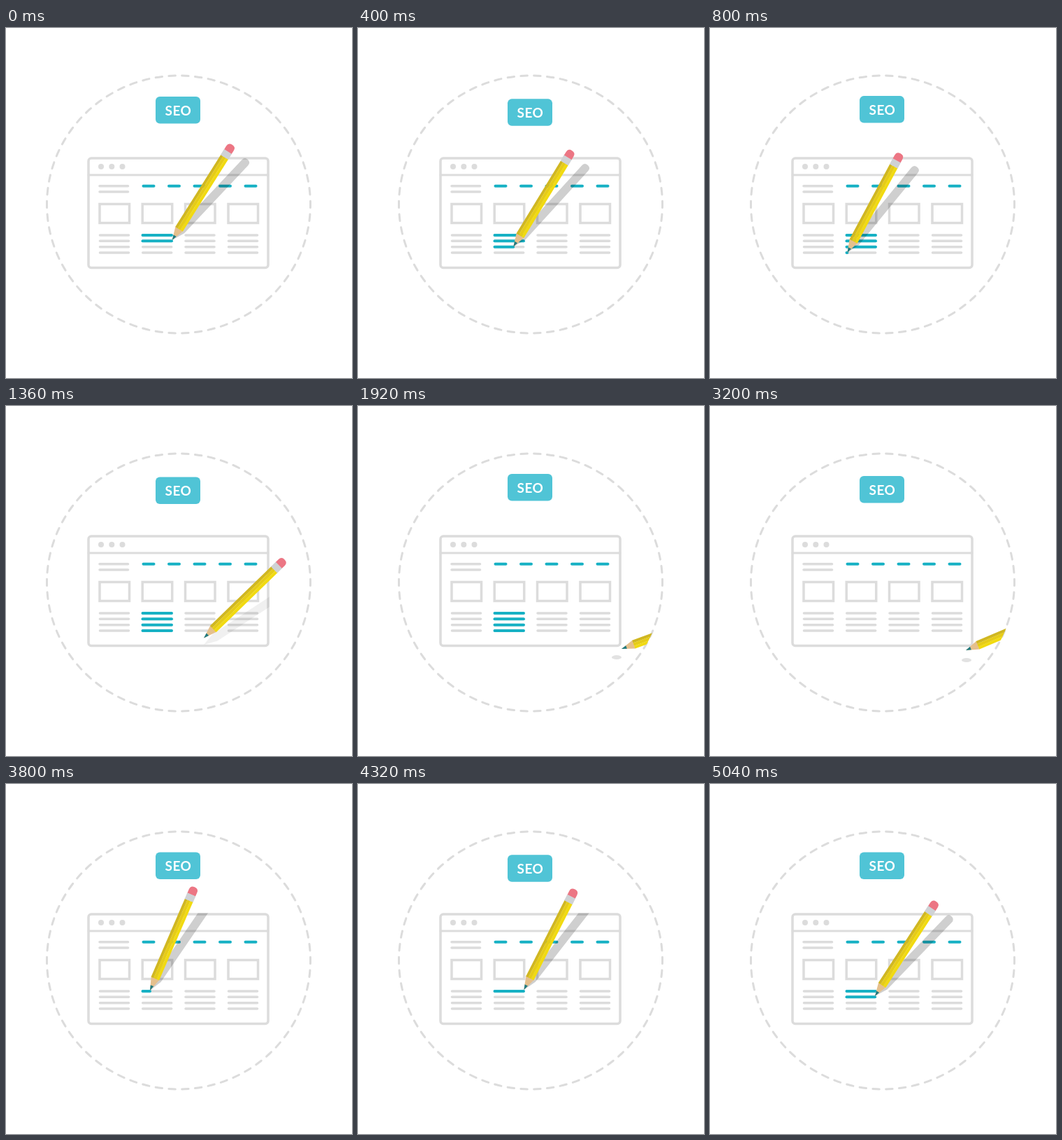
Write an HTML page that moves like this. It is 495 by 500 pixels and loops after 5.08 s.

```html
<!DOCTYPE html>
<html lang="en">
<head>
<meta charset="utf-8">
<title>SEO page sketch</title>
<style>
html, body { margin: 0; width: 100%; height: 100%; overflow: hidden; background: #fff; }
svg { display: block; width: 495px; height: 500px; }
text { font: 700 19px Lato, "Open Sans", sans-serif; letter-spacing: .5px; fill: #fff; }
</style>
</head>
<body>
<svg viewBox="0 0 495 500">
  <defs>
    <clipPath id="page"><rect x="116" y="184.5" width="261" height="160" rx="5"/></clipPath>
    <clipPath id="round"><ellipse cx="247" cy="252" rx="189" ry="184.5"/></clipPath>
  </defs>
  <ellipse cx="247" cy="252" rx="188.5" ry="184" fill="none" stroke="#dcdcdc" stroke-width="3"
    pathLength="62" stroke-dasharray=".5 .5" stroke-dashoffset=".25" stroke-linecap="round"/>
  <g fill="none" stroke="#dcdcdc" stroke-width="3.5" stroke-linecap="round">
    <rect x="118" y="186" width="257" height="156.5" rx="4"/>
    <path d="M118 210H375" stroke-width="3"/>
    <g id="cols"></g>
  </g>
  <g fill="#dcdcdc"><circle cx="136" cy="198" r="4"/><circle cx="151.300" cy="198" r="4"/><circle cx="166.500" cy="198" r="4"/></g>
  <g id="dashes" stroke="#17b1c4" stroke-width="4" stroke-linecap="round"></g>
  <g id="ink" stroke="#17b1c4" stroke-width="4" stroke-linecap="round"></g>
  <g id="badge">
    <rect x="214" y="97" width="64" height="38.500" rx="6" fill="#50c4d6"/>
    <text x="246.500" y="123.700" text-anchor="middle">SEO</text>
  </g>
  <g clip-path="url(#page)">
    <path id="shade" d="M0 0L-6 -19V-152Q-6 -158 0 -158Q6 -158 6 -152V-19Z" fill="#000"/>
  </g>
  <g clip-path="url(#round)">
    <ellipse id="spot" rx="7" ry="3" fill="#e2e2e2"/>
    <g id="pencil">
      <path d="M0 0L-6.300 -19H6.300Z" fill="#e5c08d"/>
      <path d="M0 0L-2.400 -7.500H2.400Z" fill="#1f7a80"/>
      <path d="M-6.300 -18.500H-2.200V-141H-6.300Z" fill="#d0b722"/>
      <path d="M-2.300 -18.500H2.300V-141H-2.300Z" fill="#e6cc18"/>
      <path d="M2.200 -18.500H6.300V-141H2.200Z" fill="#f1da10"/>
      <path d="M-6.300 -149V-155Q-6.300 -161 0 -161Q6.300 -161 6.300 -155V-149Z" fill="#ec7684"/>
      <path d="M-6.500 -140H6.500V-149.500H-6.500Z" fill="#cfd2d5"/>
    </g>
  </g>
</svg>
<script>
const LOOP = 5080, START = 2860;
const $ = id => document.getElementById(id);
const ROWS = [296, 304.3, 312.7, 321];
const COLS = [134.5, 195.7, 257, 318.5];

// time, tip x, tip y, lean in degrees
const KEYS = [
  [2860, 440, 352, 73], [3200, 366, 349, 67], [3440, 270, 320, 46],
  [3680, 196, 295.5, 22], [3800, 206, 295, 23.4], [4060, 224, 295, 25.5],
  [4300, 237.5, 294, 27], [4340, 237, 294, 27],
  [4490, 195, 304, 25], [5040, 236, 303, 33], [5100, 238, 303, 31.7],
  [5250, 195, 312.5, 27], [5640, 238, 312.5, 34], [5690, 238, 312.5, 34],
  [5840, 195, 321, 28], [6200, 238, 321, 36], [6260, 239, 321, 36],
  [6560, 320, 340, 55], [6780, 360, 347, 66], [7000, 377, 347, 70],
  [7320, 445, 345, 75]
];
const SPANS = [[3660, 4300], [4480, 5100], [5240, 5640], [5830, 6200]];

const ramp = (t, a, b) => {
  const p = Math.min(1, Math.max(0, (t - a) / (b - a)));
  return p * p * (3 - 2 * p);
};
const line = (x1, x2, y) => `<path d="M${x1} ${y}H${x2}"/>`;

const slope = (i, c) => (KEYS[i + 1][c] - KEYS[i][c]) / (KEYS[i + 1][0] - KEYS[i][0]);
function tangent(i, c) {
  if (i === 0) return slope(0, c);
  if (i === KEYS.length - 1) return slope(i - 1, c);
  const a = slope(i - 1, c), b = slope(i, c);
  return a * b <= 0 ? 0 : 2 * a * b / (a + b);
}
// monotone cubic through the keys
function pose(t, c) {
  const last = KEYS.length - 1;
  if (t >= KEYS[last][0]) return KEYS[last][c];
  let i = 0;
  while (t >= KEYS[i + 1][0]) i++;
  const h = KEYS[i + 1][0] - KEYS[i][0], p = (t - KEYS[i][0]) / h, q = 1 - p;
  return KEYS[i][c] * (1 + 2 * p) * q * q + tangent(i, c) * h * p * q * q
    + KEYS[i + 1][c] * p * p * (3 - 2 * p) - tangent(i + 1, c) * h * p * p * q;
}

$('cols').innerHTML = line(134, 174.5, 225.7) + line(134, 174.5, 234) + COLS.map(x =>
  `<rect x="${x - .5}" y="251.500" width="42.500" height="27" stroke-linecap="butt"/>` +
  ROWS.map(y => line(x, x + 41, y)).join('')).join('');
$('dashes').innerHTML = [0, 1, 2, 3, 4].map(i => line(196.5 + 36.5 * i, 211.5 + 36.5 * i, 225.8)).join('');
$('ink').innerHTML = ROWS.map(() => '<path/>').join('');
const strokes = [...$('ink').children];

function draw(now) {
  const clock = Math.floor(now % LOOP / 40) * 40;
  const t = clock < START ? clock + LOOP : clock;
  const [x, y, lean] = [1, 2, 3].map(c => pose(t, c));

  const bob = 2.25 * (1 - Math.cos(2 * Math.PI * (.16 + 5 * clock / LOOP)));
  $('badge').setAttribute('transform', `translate(0 ${bob})`);
  $('pencil').setAttribute('transform', `translate(${x} ${y}) rotate(${lean})`);

  const lift = 1 - ramp(t, 3400, 3680) + ramp(t, 6240, 6560);
  $('shade').setAttribute('transform', `translate(${x} ${y + 14 * lift}) rotate(${lean + 11})`);
  $('shade').setAttribute('opacity', .19 * (1 - lift));

  const back = t < 5000;
  $('spot').setAttribute('transform', back ? `translate(${x + 1} ${y + 14})` : `translate(${x - 7} ${y + 12})`);
  $('spot').setAttribute('opacity', back ? 1 - ramp(t, 3300, 3480) : ramp(t, 6780, 6920));

  $('ink').setAttribute('opacity', 1 - ramp(t, 7430, 7780));
  strokes.forEach((s, i) => {
    const [a, b] = SPANS[i];
    const end = t < b ? Math.min(237, Math.max(196, x)) : 237;
    s.setAttribute('d', t < a ? '' : `M195.500 ${ROWS[i]}H${end}`);
  });
}

let origin;
function tick(now) {
  origin ??= now;
  draw(now - origin);
  requestAnimationFrame(tick);
}
draw(0);
requestAnimationFrame(tick);
</script>
</body>
</html>
```
